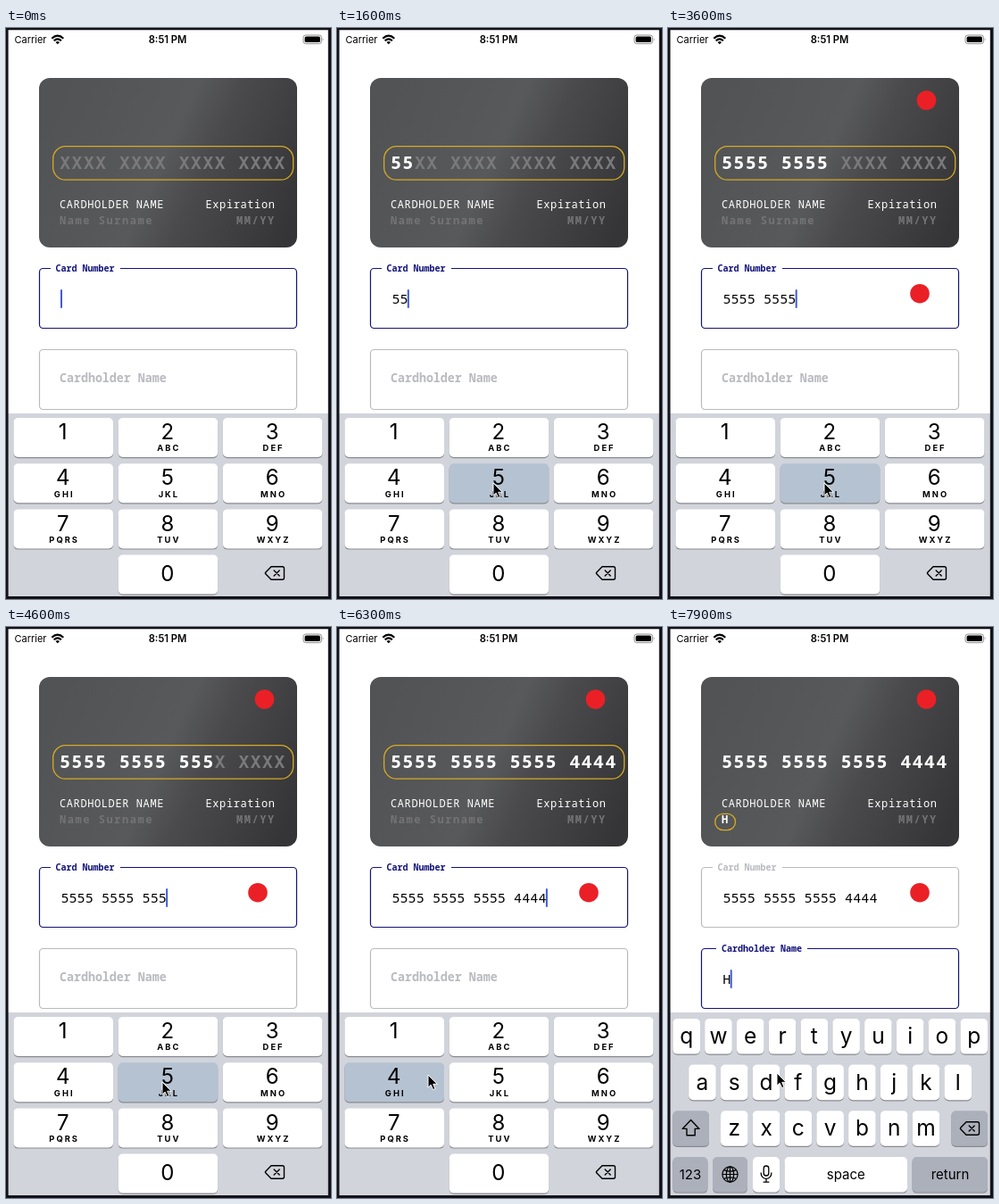
Recreate the animation shown at these times as an HTML page. Size 364 by 640 pixels, loop 8 s.

```html
<!DOCTYPE html>
<html lang="en">
<head>
<meta charset="utf-8">
<title>Card form</title>
<style>
  html, body { margin: 0; width: 100%; height: 100%; overflow: hidden; background: #fff; }
  svg { display: block; width: 364px; height: 640px; }
  text { font-family: Inter, sans-serif; white-space: pre; }
  .mono { font-family: "Noto Sans Mono", "DejaVu Sans Mono", monospace; }
  .mid { text-anchor: middle; }
</style>
</head>
<body>
<svg id="stage" viewBox="0 0 364 640"></svg>
<script>
const LOOP = 8000;
const NUMBER = '5555 5555 5555 4444';
const MASK = 'XXXX XXXX XXXX XXXX';
const NAVY = '#12127a', GRAY = '#b9bac0';
const FIVES = [1150, 1600, 1900, 2250, 2650, 2950, 3250, 3550, 4000, 4300, 4550, 4850];
const FOURS = [5500, 5800, 6050, 6300];
const TAPS = [...FIVES, ...FOURS];
const SWITCH = 6400, NAME_DOWN = 7470, NAME_TYPED = 7600;
const POINTER = [
  [100, 186, 10], [700, 190, 594], [1000, 190, 597], [1140, 175, 510], [4900, 175, 510],
  [5350, 102, 502], [6340, 102, 502], [6700, 140.5, 508], [7000, 140.5, 508],
  [7430, 214, 510], [7600, 214, 510], [7900, 122, 500], [8000, 112, 498]
];

const clamp = v => Math.max(0, Math.min(1, v));
const ease = v => v * v * (3 - 2 * v);
const ramp = (t, from, len) => ease(clamp((t - from) / len));
const mix = (a, b, k) => a + (b - a) * k;

const rect = (x, y, w, h, r, fill, more = '') =>
  `<rect x="${x}" y="${y}" width="${w}" height="${h}" rx="${r}" fill="${fill}" ${more}/>`;
const text = (x, y, size, str, more = '') =>
  `<text x="${x}" y="${y}" font-size="${size}" ${more}>${str}</text>`;
const mono = (x, y, size, gap, str, more = '') =>
  text(x, y, size, str, `class="mono" letter-spacing="${gap}" ${more}`);
const key = (x, y, w, h, fill = '#fff', more = '') =>
  rect(x, y + 1.2, w, h, 5, '#898b91') + rect(x, y, w, h, 5, fill, more);

function eraser(x, y, fill) {
  return `<g transform="translate(${x} ${y})" fill="none" stroke="#000" stroke-width="1.4"
    stroke-linecap="round" stroke-linejoin="round">
    <path d="M-4-7.3H8.5Q10.5-7.3 10.5-5.3V5.3Q10.5 7.3 8.5 7.3H-4L-10.5 .6V-.6Z" fill="${fill}"/>
    <path d="M-.8-3L5.2 3M5.2-3L-.8 3"/></g>`;
}

function statusBar() {
  return text(9.5, 16.6, 11, 'Carrier') +
    text(181, 16.8, 11.2, '8:51 PM', 'class="mid" font-weight="600"') +
    `<g fill="none" stroke="#000" stroke-width="2.1">
      <path d="M51.3 11.8Q57.8 5.6 64.3 11.8"/><path d="M53.7 14.3Q57.8 10.4 61.9 14.3"/></g>
    <path d="M55.6 15.9Q57.8 14 60 15.9L57.8 18.3Z"/>` +
    rect(333, 8, 20.5, 9.6, 2.8, 'none', 'stroke="#8d8d8f"') +
    rect(334.6, 9.6, 17.3, 6.4, 1.5, '#000') +
    '<path d="M354.8 11.2Q356.6 12.8 354.8 14.4Z" fill="#8d8d8f"/>';
}

function card() {
  return rect(37, 56, 289, 190, 12, 'url(#metal)') +
    mono(60, 157.6, 20.4, 1.11,
      '<tspan id="typed" fill="#fff"></tspan><tspan id="left" fill="#7a7a7c"></tspan>', 'font-weight="700"') +
    mono(60, 201.8, 12, 0.6, 'CARDHOLDER NAME', 'fill="#fff" font-weight="500"') +
    mono(223.5, 201.8, 12, 0.6, 'Expiration', 'fill="#fff" font-weight="500"') +
    mono(60, 220.4, 12, 1.55, 'Name Surname', 'id="owner" font-weight="600"') +
    mono(258, 220.4, 12, 1.55, 'MM/YY', 'fill="#747476" font-weight="600"') +
    rect(0, 0, 0, 0, 0, 'none', 'id="ring" stroke="#d6ab22" stroke-width="1.3"');
}

function fields() {
  const box = (y, id) => rect(37.5, y, 288, 67, 4, '#fff', `id="${id}" stroke-width="1.2"`);
  return box(269.5, 'box1') + rect(50, 267, 78, 5, 0, '#fff') +
    mono(55.5, 273.4, 10, 0, 'Card Number', 'id="label1" font-weight="700"') +
    mono(61.4, 309.3, 15.2, 0, '', 'id="input1"') +
    box(360.5, 'box2') + rect(54, 358, 102, 5, 0, '#fff', 'id="notch"') +
    mono(60, 397, 13.3, 0, 'Cardholder Name', 'id="label2" font-weight="700"') +
    mono(61.2, 400.3, 15.2, 0, '', 'id="input2"') +
    rect(61, 293, 2, 21, 1, '#3f5bd6', 'id="caret"');
}

function numberPad() {
  const subs = ['', 'ABC', 'DEF', 'GHI', 'JKL', 'MNO', 'PQRS', 'TUV', 'WXYZ'];
  const cell = (col, row, n, sub) => {
    const x = 8.5 + col * 117.2, y = 437 + row * 51.2, mid = x + 55.7;
    return key(x, y, 111.5, 44, '#fff', `id="num${n}"`) +
      text(mid - 0.5, y + (n ? 24.2 : 29.4), 24, n, 'class="mid"') +
      text(mid + 1, y + 37.4, 9.4, sub, 'class="mid" font-weight="700" letter-spacing="2"');
  };
  return subs.map((s, i) => cell(i % 3, Math.floor(i / 3), i + 1, s)).join('') +
    cell(1, 3, 0, '') + eraser(301, 611, 'none');
}

function letterPad() {
  const dark = '#acb0bb', pitch = 35.78;
  const row = (chars, x, y) => [...chars].map((c, i) =>
    key(+(x + i * pitch).toFixed(2), y, 30.6, 39.6) +
    text((x + 15.3 + i * pitch).toFixed(2), y + 28.2, 22.5, c, 'class="mid letter"')).join('');
  const word = (x, str) => text(x, 618.8, 15, str, 'class="mid"');
  return row('QWERTYUIOP', 5.4, 439) + row('ASDFGHJKL', 23.2, 490.6) + row('ZXCVBNM', 59, 542.2) +
    key(5.4, 542.2, 40.6, 39.6, '#fff', 'id="shift"') +
    `<path id="arrow" d="M25.6 552.5L35 562.4H30.2V569.8H21V562.4H16.2Z" stroke="#000"
      stroke-width="1.4" stroke-linejoin="round"/>` +
    key(317.4, 542.2, 40.6, 39.6, dark) + eraser(338, 562, 'none') +
    key(5.4, 594, 39, 39.4, dark) + word(25, '123') +
    key(50, 594, 39, 39.4, dark) +
    `<g fill="none" stroke="#000" stroke-width="1.2"><circle cx="69.5" cy="613.5" r="8.6"/>
      <ellipse cx="69.5" cy="613.5" rx="4.2" ry="8.6"/>
      <path d="M69.5 604.9V622.1M60.9 613.5H78.1M62.6 608.6Q69.5 611.6 76.4 608.6M62.6 618.4Q69.5 615.4 76.4 618.4"/></g>` +
    key(95, 594, 30, 39.4) +
    rect(107.2, 604, 5.6, 11, 2.8, 'none', 'stroke="#000" stroke-width="1.3"') +
    `<path d="M104.2 611.5V612.5A5.8 5.8 0 0 0 115.8 612.5V611.5M110 618.4V622M106.6 622.2H113.4"
      fill="none" stroke="#000" stroke-width="1.3"/>` +
    key(130.5, 594, 137.5, 39.4) + word(199.3, 'space') +
    key(273.5, 594, 84.5, 39.4, dark) + word(316, 'return') +
    `<g id="popup"><path d="M202 528V500Q195 493 195 486V445Q195 437 203 437H232Q240 437 240 445V486
      Q240 493 233 500V528Q233 532 229 532H206Q202 532 202 528Z" fill="#fff" stroke="#b4b6bc" stroke-width=".7"/>` +
    text(217.5, 477, 33, 'H', 'class="mid"') + '</g>';
}

document.getElementById('stage').innerHTML =
  `<defs><linearGradient id="metal" gradientUnits="userSpaceOnUse" x1="50" y1="95" x2="318" y2="217">
    <stop offset="0" stop-color="#525355"/><stop offset=".46" stop-color="#58595b"/>
    <stop offset=".62" stop-color="#4a4a4c"/><stop offset="1" stop-color="#353537"/>
  </linearGradient></defs>` +
  rect(0, 0, 364, 640, 0, '#fff') + statusBar() + card() + fields() +
  `<g id="badge" fill="#ea2026"><circle cx="289.5" cy="81" r="10.8"/><circle cx="282" cy="297.7" r="10.8"/></g>` +
  rect(0, 432, 364, 208, 0, '#d1d4db') +
  `<g id="numbers">${numberPad()}</g><g id="letters">${letterPad()}</g>` +
  '<path d="M0 0H364V640H0ZM2.6 2.2V637H360.8V2.2Z" fill="#131218" fill-rule="evenodd"/>' +
  `<path id="pointer" d="M0 0V14.2L3.2 11.2L5.6 16.6L8 15.6L5.7 10.3H10.2Z" stroke="#fff"
    stroke-width="1" stroke-linejoin="round"/>`;

const el = {};
document.querySelectorAll('[id]').forEach(e => el[e.id] = e);
const letters = [...document.querySelectorAll('.letter')];
const set = (e, attrs) => { for (const k in attrs) e.setAttribute(k, attrs[k]); };
const show = (e, on) => set(e, { display: on ? 'inline' : 'none' });
const held = (taps, t) => taps.some(s => t >= s && t < s + 180);

function pointerAt(t) {
  const i = Math.max(1, POINTER.findIndex(p => p[0] > t));
  const [a, b] = [POINTER[i - 1], POINTER[i]];
  const k = ramp(t, a[0], b[0] - a[0]);
  return [mix(a[1], b[1], k), mix(a[2], b[2], k)];
}

// Solid just after input, then a soft blink.
function caretAlpha(t) {
  const last = Math.max(0, ...[...TAPS, SWITCH, NAME_TYPED].filter(s => s <= t));
  const p = (t - last) % 1000;
  return 1 - ramp(p, 500, 150) + ramp(p, 850, 150);
}

function draw(t) {
  const count = TAPS.filter(s => s <= t).length;
  const chars = count ? count + Math.floor((count - 1) / 4) : 0;
  const second = t >= SWITCH, named = t >= NAME_TYPED;

  el.typed.textContent = NUMBER.slice(0, chars);
  el.left.textContent = MASK.slice(chars);
  el.input1.textContent = NUMBER.slice(0, chars);
  el.input2.textContent = named ? 'H' : '';
  el.owner.textContent = named ? 'H' : 'Name Surname';
  set(el.owner, { fill: named ? '#fff' : '#747476' });

  const move = ramp(t, SWITCH, 300), shrink = ramp(t, NAME_TYPED, 220);
  const h = mix(37.6, 18.2, move);
  set(el.ring, {
    x: 52.7, y: mix(132.6, 209.4, move), width: mix(mix(269, 118, move), 22.8, shrink),
    height: h, rx: mix(14, 9.1, move)
  });

  const lift = ramp(t, SWITCH, 200);
  set(el.box1, { stroke: second ? GRAY : NAVY });
  set(el.label1, { fill: second ? GRAY : NAVY });
  set(el.box2, { stroke: second ? NAVY : GRAY });
  set(el.notch, { opacity: lift });
  set(el.label2, {
    y: mix(397, 364.4, lift), 'font-size': mix(13.3, 10, lift), fill: second ? NAVY : GRAY
  });
  set(el.caret, {
    x: 61 + 9.12 * (second ? +named : chars) - (chars ? 0.4 : 0),
    y: second ? 384 : 293, opacity: caretAlpha(t)
  });
  set(el.badge, { opacity: ramp(t, 1650, 500) });

  show(el.numbers, !second);
  show(el.letters, second);
  set(el.num5, { fill: held(FIVES, t) ? '#b5c2d1' : '#fff' });
  set(el.num4, { fill: held(FOURS, t) ? '#b5c2d1' : '#fff' });
  letters.forEach(e => {
    const c = e.textContent;
    e.textContent = named ? c.toLowerCase() : c.toUpperCase();
    set(e, { 'font-size': named ? 24.5 : 22.5 });
  });
  set(el.shift, { fill: named ? '#acb0bb' : '#fff' });
  set(el.arrow, { fill: named ? 'none' : '#000' });
  show(el.popup, t >= NAME_DOWN && !named);

  show(el.pointer, t >= 100);
  const [px, py] = pointerAt(t);
  set(el.pointer, { transform: `translate(${px.toFixed(2)} ${py.toFixed(2)})` });
}

const start = performance.now();
function tick() {
  draw((performance.now() - start) % LOOP);
  requestAnimationFrame(tick);
}
tick();
</script>
</body>
</html>
```
